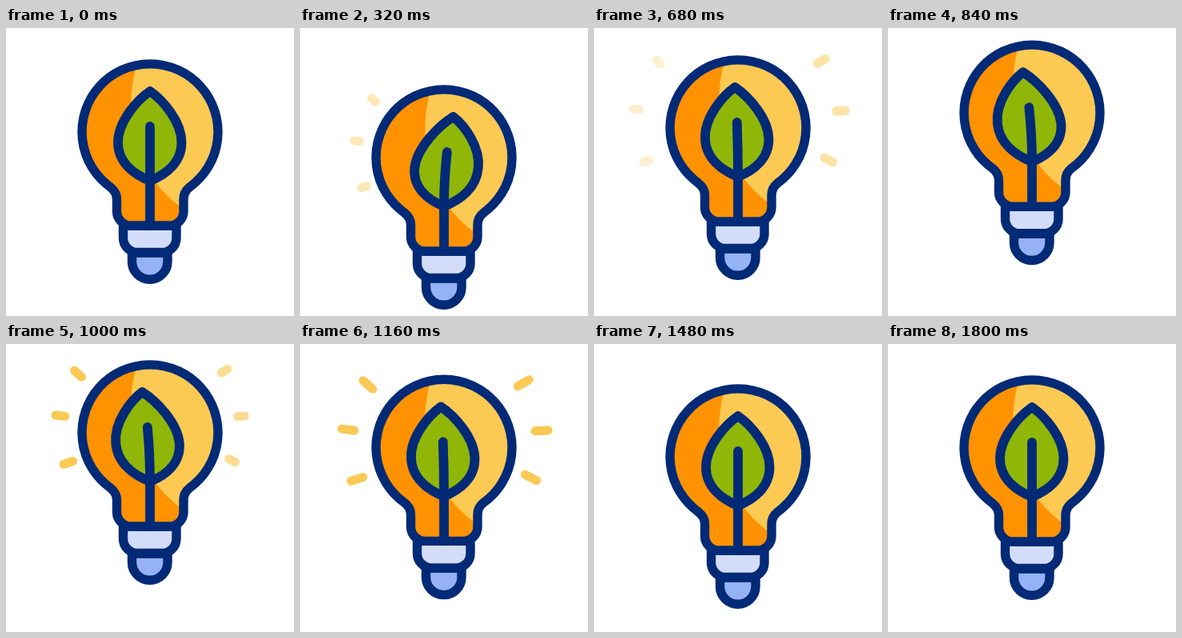
An HTML page for the animation above (2 s loop, 360x360 px).

```html
<!DOCTYPE html>
<html lang="en">
<head>
<meta charset="utf-8">
<title>Green energy bulb</title>
<style>
  html, body { margin: 0; width: 100%; height: 100%; overflow: hidden; background: #fff; }
  svg { display: block; width: 100%; height: 100%; }
  .line { stroke: #022a76; stroke-width: 11.4; stroke-linecap: round; stroke-linejoin: round; }
  #leaf, #stem { stroke-width: 11.8; }
</style>
</head>
<body>
<svg viewBox="0 0 360 360">
  <defs>
    <path id="glass" d="M131 199.3 A85 85 0 1 1 229 199.3 C224.5 203 222 208 222 214 V229 A18 18 0 0 1 204 247 H156.5 A18 18 0 0 1 138.5 229 V214 C138.5 208 135.5 203 131 199.3 Z"/>
    <clipPath id="inside"><use href="#glass"/></clipPath>
  </defs>
  <g id="bulb">
    <g id="rays" stroke="#fbc954" stroke-width="11" stroke-linecap="round"></g>
    <path class="line" fill="#95b2f6" d="M157.5 281 V292 A22.25 22.25 0 0 0 202 292 V281 Z"/>
    <path class="line" fill="#d3ddfa" d="M146.5 247 V262.5 A18 18 0 0 0 164.5 280.5 H195 A18 18 0 0 0 213 262.5 V247 Z"/>
    <use href="#glass" fill="#ff9200"/>
    <path clip-path="url(#inside)" fill="#fcc953" d="M164 44 C146 100 158 180 218 223.5 L222 227 H280 V40 Z"/>
    <use href="#glass" class="line" fill="none"/>
    <path id="leaf" class="line" fill="#90b608"/>
    <path id="stem" class="line" fill="none"/>
  </g>
</svg>
<script>
const LOOP = 2000, STEP = 40, RAY_LIFE = 450;
const bulb = document.getElementById('bulb');
const leaf = document.getElementById('leaf');
const stem = document.getElementById('stem');
const rayLayer = document.getElementById('rays');

// [time, value]
const heightKeys = [[0, 0], [50, 0], [320, 32], [360, 34], [600, 8.7], [680, -5], [880, -25],
  [1000, -19], [1160, -0.6], [1335, 19], [1480, 11], [1720, 0.6], [1800, 0], [2000, 0]];
const swayKeys = [[0, 0], [40, 0], [360, 12], [880, -11.5], [1340, 0], [2000, 0]];

// Bezier points of the upright leaf, from the tip down the left side and back up
const LEAF_TIP = 79, LEAF_BASE = 191;
const leafPoints = [[180, 79], [164, 90], [140, 117], [140, 143], [140, 168], [160, 183], [180, 191],
  [200, 183], [219.5, 168], [219.5, 143], [219.5, 117], [196, 90], [180, 79]];

// Start point, direction in degrees, travel, birth times
const leftBirths = [280, 898], rightBirths = [330, 940];
const rays = [
  [93.3, 59.2, 222, 19, leftBirths],
  [73, 109.3, 187, 22, leftBirths],
  [82, 166, 162, 19, leftBirths],
  [271, 54, -30, 19, rightBirths],
  [291, 109.5, -3, 22, rightBirths],
  [280.5, 163.5, 27, 18, rightBirths]
].map(([x, y, angle, travel, births]) => {
  const line = document.createElementNS('http://www.w3.org/2000/svg', 'line');
  line.setAttribute('transform', `translate(${x} ${y}) rotate(${angle})`);
  rayLayer.append(line);
  return { line, travel, births };
});

function findSegment(keys, t) {
  let i = 0;
  while (i < keys.length - 2 && t >= keys[i + 1][0]) i++;
  return i;
}

function easeBetween(keys, t) {
  const i = findSegment(keys, t);
  const [t0, v0] = keys[i], [t1, v1] = keys[i + 1];
  return v0 + (v1 - v0) * (1 - Math.cos(Math.PI * (t - t0) / (t1 - t0))) / 2;
}

// Cubic curve through the keys that never overshoots them
function smoothThrough(keys, t) {
  const slope = i => (keys[i + 1][1] - keys[i][1]) / (keys[i + 1][0] - keys[i][0]);
  const tangent = i => {
    if (i === 0 || i === keys.length - 1) return 0;
    const a = slope(i - 1), b = slope(i);
    return a * b <= 0 ? 0 : 2 * a * b / (a + b);
  };
  const i = findSegment(keys, t);
  const [t0, v0] = keys[i], [t1, v1] = keys[i + 1];
  const span = t1 - t0, u = (t - t0) / span, w = 1 - u;
  return v0 * w * w * (1 + 2 * u) + v1 * u * u * (3 - 2 * u)
    + span * u * w * (tangent(i) * w - tangent(i + 1) * u);
}

// The leaf bends more the higher a point lies above its base
function leafPath(sway) {
  const bent = leafPoints.map(([x, y]) =>
    [x + sway * ((LEAF_BASE - y) / (LEAF_BASE - LEAF_TIP)) ** 1.5, y]);
  return `M${bent[0]} C${bent.slice(1).join(' ')} Z`;
}

function drawRay({ line, travel, births }, t) {
  const birth = births.find(b => t > b && t < b + RAY_LIFE);
  line.style.display = birth === undefined ? 'none' : '';
  if (birth === undefined) return;
  const age = t - birth;
  const center = travel * age / 440;
  const half = 8 * Math.sin(Math.PI * age / RAY_LIFE) ** 0.7;
  line.setAttribute('x1', center - half);
  line.setAttribute('x2', center + half);
  line.setAttribute('opacity', Math.min(1, age / 95, (RAY_LIFE - age) / 190));
}

function draw(now) {
  const t = Math.floor((now % LOOP + 4) / STEP) * STEP % LOOP;
  const sway = easeBetween(swayKeys, t);
  bulb.setAttribute('transform', `translate(0 ${smoothThrough(heightKeys, t)})`);
  leaf.setAttribute('d', leafPath(sway));
  stem.setAttribute('d', `M180 247 V190 Q180 158 ${180 + sway * 0.33} 123`);
  rays.forEach(ray => drawRay(ray, t));
}

let start;
function tick(now) {
  start ??= now;
  draw(now - start);
  requestAnimationFrame(tick);
}
draw(0);
requestAnimationFrame(tick);
</script>
</body>
</html>
```
